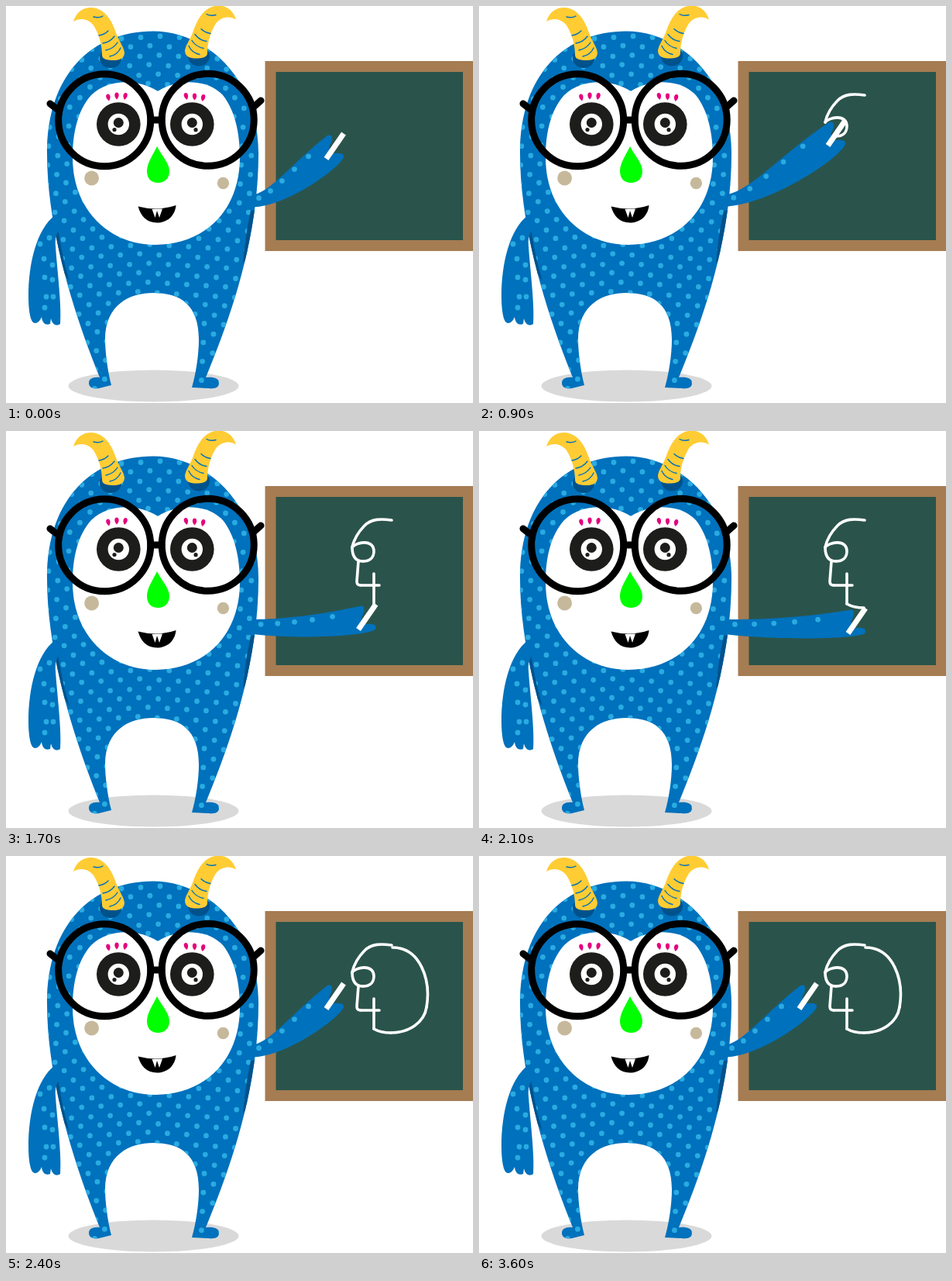
Write an HTML page that moves like this. It is 603 px wide and 512 px high and loops after 5.6 s.

```html
<!DOCTYPE html>
<html lang="en">
<head>
<meta charset="utf-8">
<title>Monster at the blackboard</title>
<style>
  html, body { margin: 0; width: 100%; height: 100%; overflow: hidden; background: #fff; }
  svg { display: block; width: 603px; height: 512px; }
  .blue { fill: #0071bc; }
  .dark { fill: #00528c; }
  .dots { fill: #29abe2; }
  .horn { fill: #ffcc33; }
  .line { fill: none; stroke-linecap: round; stroke-linejoin: round; }
  .glasses { stroke: #000; stroke-width: 9; }
  .sketch { stroke: #fff; stroke-width: 3.6; }
</style>
</head>
<body>
<svg viewBox="0 0 603 512">
  <defs>
    <path id="bodyShape" d="M190 32.500C112 32.500 53 87 53 190C53 290 89 400 121 479C112 478 107 481 107 486C107 492 112 494 120 493L136 489C131 470 128 445 128 430C128 385 160 370 190 370C225 370 249 385 249 430C249 450 245 475 240 492L262 493C272 494 275 491 275 486C275 480 268 478 258 479C290 402 326 300 326 190C326 92 258 32.500 190 32.500Z"/>
    <clipPath id="bodyClip"><use href="#bodyShape"/></clipPath>
    <g id="horn">
      <ellipse class="dark" cx="135" cy="67" rx="14" ry="13"/>
      <path class="horn" d="M87 20C91 7 100 2 110 2C129 3 137 20 143 37C147 47 152 53 153 60C153 68 146 70 139 70C131 70 124 69 124 63C124 50 120 36 113 25C106 16 95 15 87 20Z"/>
      <path class="line" stroke="#0071bc" stroke-width="1.4" d="M113 14Q120 16 125 13M120 38Q127 37 132 32M125 48Q134 47 140 39M129 57Q139 55 144 47M134 65Q144 63 148 54"/>
    </g>
    <path id="lash" fill="#e5007e" d="M0 5C-4 1 -3 -4 0 -4C3 -4 4 1 0 5Z"/>
    <g id="eye">
      <circle r="28.3" fill="#1d1d1b"/>
      <circle r="13.7" fill="#fff"/>
      <circle cy="-2" r="6.5" fill="#1d1d1b"/>
    </g>
  </defs>

  <ellipse cx="190.500" cy="490" rx="110" ry="20.500" fill="#d9d9d9"/>
  <path fill="#a67c52" d="M334.500 71H603V316H334.500Z"/>
  <path fill="#2a544b" d="M348.500 85H590V302H348.500Z"/>

  <use href="#bodyShape" class="blue"/>
  <g clip-path="url(#bodyClip)">
    <g id="bodyDots" class="dots"></g>
    <path class="dark" d="M58 284L67 287C70 305 73 325 82 355L60 322ZM328 262L316 264C312 283 309 300 306 332L324 310Z"/>
  </g>
  <path class="blue" d="M63 270C40 288 29 330 29 375C29 390 31 403 34 407C37 411 43 409 46 401C47 410 52 412 57 410L58 403C60 412 66 413 70 410C72 385 66 340 64 310C63 300 65 292 72 285Z"/>
  <g id="sideDots" class="dots"></g>

  <use href="#horn"/>
  <use href="#horn" transform="translate(384 -2.500) scale(-1 1)"/>

  <path fill="#fff" d="M196 110C172 94 132 93 110 115C92 135 86 165 86 195C86 265 135 308 193 308C255 308 302 265 302 195C302 165 296 135 280 115C259 93 220 94 196 110Z"/>
  <use href="#lash" transform="translate(132 117.500) rotate(-12)"/>
  <use href="#lash" transform="translate(143 115.500)"/>
  <use href="#lash" transform="translate(154 116) rotate(12)"/>
  <use href="#lash" transform="translate(232.500 116) rotate(-12)"/>
  <use href="#lash" transform="translate(243.500 116.500)"/>
  <use href="#lash" transform="translate(254.500 118) rotate(12)"/>

  <g id="openEyes">
    <use href="#eye" x="145.300" y="152.500"/>
    <use href="#eye" x="240.300" y="152.500"/>
    <circle cx="140" cy="159.500" r="2.600" fill="#1d1d1b"/>
    <circle cx="245" cy="159.700" r="2.600" fill="#1d1d1b"/>
  </g>
  <path id="closedEyes" class="line" stroke="#1d1d1b" stroke-width="4" d="M115 150Q145 168 176 150M210 150Q240 168 272 150"/>

  <g class="line glasses">
    <circle cx="127.200" cy="147.300" r="59.500"/>
    <circle cx="260.700" cy="146.800" r="59.500"/>
    <path d="M187 147H201M57 126L66 133M329 122L320 130"/>
  </g>

  <path fill="#0f0" d="M195 181C200 192 211 202 211 213C211 223 204 228 196.500 228C188 228 182 223 182 213C182 202 190 192 195 181Z"/>
  <circle cx="110.600" cy="222" r="9.400" fill="#c6b99b"/>
  <circle cx="280.400" cy="228.500" r="7.700" fill="#c6b99b"/>
  <path d="M170.500 258.500Q195 265 219.500 257C218 272 207 279.500 195 279.500C182 279.500 174 271 170.500 258.500Z"/>
  <path fill="#fff" d="M188.500 262L202 261.500L198 273L195 264L192.500 273Z"/>

  <g id="sketch" class="line sketch"></g>
  <path id="arm" class="blue"/>
  <g id="armDots" class="dots"></g>
  <path id="chalk" d="M0.500 0L23 -32.500" stroke="#fff" stroke-width="7"/>
</svg>

<script>
const LOOP = 5600;
const REST = [413, 197];

// [start time, chalk end held by the hand]
const poses = [
  [0, REST], [500, [475, 146]], [700, [423, 183]], [900, [450, 180]],
  [1300, [429, 231]], [1500, [451, 216]], [1700, [454.5, 256]],
  [2100, [476, 261]], [2200, [521.5, 228]], [2300, [475, 151]], [2400, REST]
];

// [time it appears, chalk line]
const strokes = [
  [700, 'M498 115C484 113 472 113 463 122C455 130 449 141 447 150'],
  [900, 'M447 150C452 143 475 139 475 155C475 164 469 168 461 168'],
  [1300, 'M461 168C452 168 447 162 447 150M455 168L453 194Q453 199 458 199'],
  [1500, 'M458 199H482'],
  [1700, 'M475 184V223'],
  [2100, 'M475 223C482 227 490 228 497 228'],
  [2200, 'M497 228C520 228 540 215 543 195'],
  [2300, 'M543 195C549 160 535 118 499 118']
];

const blinks = [2300, 2900, 3500];
const BLINK = 100;

const $ = id => document.getElementById(id);

function add(parent, tag, attrs) {
  const node = document.createElementNS('http://www.w3.org/2000/svg', tag);
  for (const key in attrs) node.setAttribute(key, attrs[key]);
  return parent.appendChild(node);
}

const dot = (parent, cx, cy) => add(parent, 'circle', { cx, cy, r: 3.4 });

for (let row = 0; row < 38; row++) {
  for (let col = -7; col < 8; col++) {
    const x = 199 + col * 25 - (row % 2) * 12.5 - row * 0.6;
    dot($('bodyDots'), x, 39 + row * 12.2 + Math.abs(col) * 1.5);
  }
}
[[44, 307], [56, 299], [49, 326], [60, 334], [50, 350], [60, 353], [52, 375], [61, 375], [50, 389]]
  .forEach(([x, y]) => dot($('sideDots'), x, y));

const lines = strokes.map(([time, d]) => [time, add($('sketch'), 'path', { d })]);

function bezier(points, t) {
  const u = 1 - t;
  const weights = [u * u * u, 3 * u * u * t, 3 * u * t * t, t * t * t];
  return [0, 1].map(axis => points.reduce((sum, p, i) => sum + p[axis] * weights[i], 0));
}

// The arm runs from a fixed shoulder to the hand at (x, y).
function drawArm([x, y]) {
  const dx = x - 322, dy = y - 251;
  const top = [[321, 243], [321 + 0.25 * dx, 242 + 0.08 * dy], [321 + 0.55 * dx, 236 + 0.65 * dy], [x + 2, y - 30]];
  const bottom = [[x + 11, y + 9 - 0.15 * dy], [322 + 0.44 * dx, 268 + 0.2 * dy], [321, 262 + 0.05 * dy]];
  $('arm').setAttribute('d',
    `M${top[0]}C${top.slice(1)}q6 -2 6 4q0 5 -4 11l6 8q12 -1 13 3q0 3 -1 4C${bottom}Z`);
  $('chalk').setAttribute('transform', `translate(${x} ${y})`);
  $('armDots').replaceChildren();
  for (const t of [0.08, 0.28, 0.46, 0.63, 0.8]) {
    const [px, py] = bezier(top, t);
    dot($('armDots'), px, py + 6.5);
  }
}

let shown;
function frame() {
  const now = performance.now() % LOOP;
  const pose = poses.findLast(([time]) => time <= now);
  if (pose !== shown) drawArm((shown = pose)[1]);
  for (const [time, line] of lines) line.style.display = now >= time ? '' : 'none';
  const closed = blinks.some(time => now >= time && now < time + BLINK);
  $('openEyes').style.display = closed ? 'none' : '';
  $('closedEyes').style.display = closed ? '' : 'none';
  requestAnimationFrame(frame);
}
frame();
</script>
</body>
</html>
```
